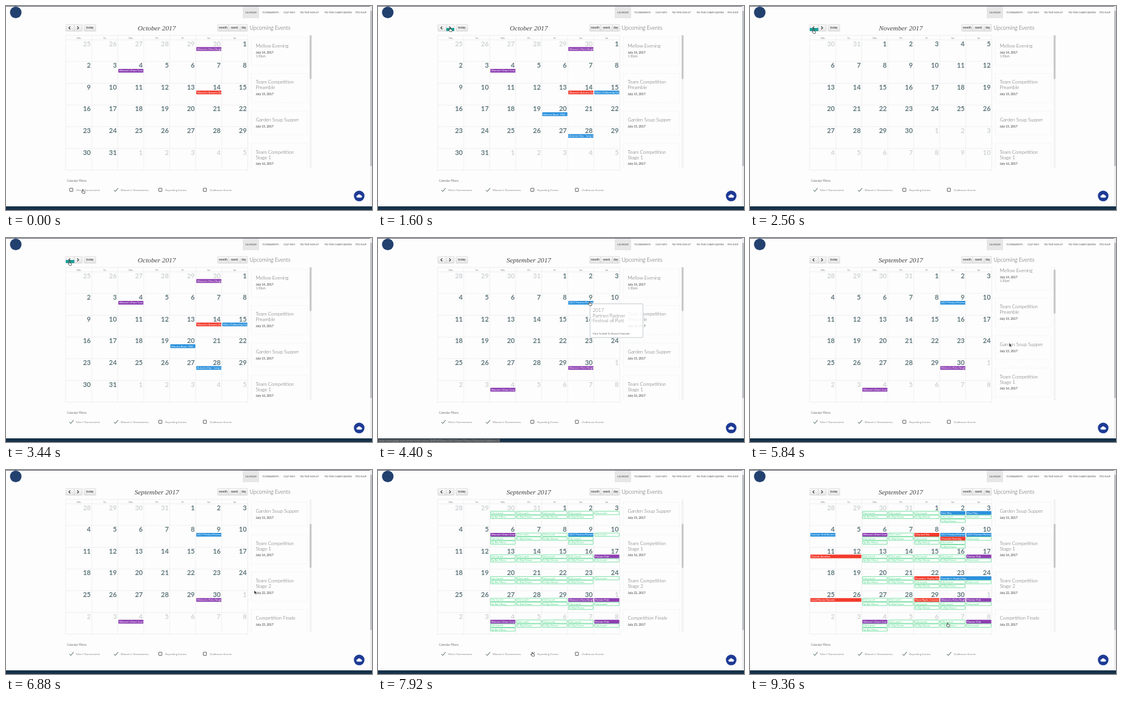
These frames come from a looping animation (600x334 px, 9440 ms). An HTML page:

```html
<!DOCTYPE html>
<html lang="en">
<head>
<meta charset="utf-8">
<title>Club calendar</title>
<style>
html, body { margin: 0; width: 100%; height: 100%; overflow: hidden; background: #fdfdfd; }
svg { display: block; }
text { font-family: Lato, "Open Sans", sans-serif; }
.light { font-weight: 300; }
.bold { font-weight: 700; }
.mid { text-anchor: middle; }
.end { text-anchor: end; }
.title { font: italic 11.3px "Liberation Serif", "Times New Roman", serif; }
</style>
</head>
<body>
<svg id="stage" width="600" height="334" viewBox="0 0 600 334">
  <defs>
    <linearGradient id="btn" x2="0" y2="1"><stop stop-color="#fafafa"/><stop offset="1" stop-color="#e4e4e4"/></linearGradient>
    <clipPath id="listClip"><rect x="399" y="48" width="98" height="218"/></clipPath>
  </defs>
  <rect width="600" height="334" fill="#fdfdfd"/>
  <g id="page"></g>
  <g id="hover"></g>
  <g id="arrows" fill="none" stroke="#333" stroke-width="1.1">
    <path d="M105.3 33.4l-2.3 2.3 2.3 2.3M116.8 33.4l2.3 2.3-2.3 2.3"/>
  </g>
  <g id="calendar"></g>
  <g clip-path="url(#listClip)"><g id="list"></g></g>
  <rect id="thumb" x="497.8" width="3" height="71.5" fill="#c6c6c6"/>
  <g id="filters"></g>
  <g id="popup"></g>
  <g id="status"></g>
  <g id="cursor">
    <path id="arrow" d="M0 0v6l1.4-1.2 1 2.2 1-.5-1-2.1h1.8z" fill="#222" stroke="#fff" stroke-width=".4"/>
    <path id="hand" d="M-.8-2.4q.8-.7 1.3 0v2.2l2.6.6q.7.3.5 1.1l-.6 2.4h-3.1l-2-2.5q0-.9 1.3-.2z" fill="#fff" stroke="#222" stroke-width=".7"/>
  </g>
</svg>
<script>
const LOOP = 9440, STEP = 80;
const LEFT = 98, TOP = 55.3, COL = 42.6, ROW = 35.6;
const PURPLE = '#8e3fb2', RED = '#f23a2c', BLUE = '#2b91dc', GREEN = '#45d483', GRID = '#e6e6e6';
const $ = id => document.getElementById(id);

const rect = (x, y, w, h, fill, more = '') =>
  `<rect x="${x}" y="${y}" width="${w}" height="${h}" fill="${fill}" ${more}/>`;
const line = (x1, y1, x2, y2, color, more = '') =>
  `<path d="M${x1} ${y1}L${x2} ${y2}" stroke="${color}" ${more}/>`;
// y is the middle of the capitals
const text = (x, y, size, color, str, cls = '') =>
  `<text x="${x}" y="${y + size * 0.36}" font-size="${size}" fill="${color}" class="${cls}">${str.replace(/&/g, '&amp;')}</text>`;

const clubCup = "Founder's Trophy Day";
const pairs = "Women's Pairs/Singles", shortCourse = "Women's Short Course";
const partner = '2017 Partner/Partner';

// Event: filter, row, column, colour, label, days
const october = [
  ['w', 0, 5, PURPLE, pairs], ['w', 1, 2, PURPLE, shortCourse],
  ['w', 2, 5, RED, "Women's Autumn Day"], ['m', 2, 6, BLUE, "Men's Fellowship Day"],
  ['m', 3, 4, BLUE, 'Harvest Bowl -TBD'], ['m', 4, 5, BLUE, 'Autumn Day - Long Loop']
];
const september = [
  ['m', 1, 5, BLUE, partner], ['w', 4, 5, PURPLE, pairs], ['w', 5, 2, PURPLE, shortCourse],
  ['r', 1, 2, PURPLE, shortCourse],
  ['c', 0, 5, BLUE, 'Free Play'], ['c', 0, 6, BLUE, 'Free Play'],
  ['c', 1, 0, BLUE, 'Summer End Bouncefest'], ['c', 1, 4, RED, 'Clay and Tea'],
  ['c', 1, 5, RED, 'Chowder Evening'], ['c', 1, 6, BLUE, partner],
  ['c', 2, 0, RED, 'Closed: Aeration', 2],
  ['c', 3, 4, RED, clubCup], ['c', 3, 5, BLUE, clubCup, 2],
  ['c', 4, 0, RED, 'Local Novice Rounds', 2], ['c', 4, 4, RED, 'Pasta Night: Crooners']
];
for (let row = 0; row < 6; row++) {
  if (row > 1 && row !== 3) september.push(['r', row, 6, PURPLE, 'Partner Putt']);
  for (let col = 2; col < 7; col++) {
    september.push(['r', row, col, GREEN, '12a Lunch']);
    if (col < 6) september.push(['r', row, col, GREEN, col === 2 ? '5p Bar Menu' : '5:30p Dinner']);
  }
}

// First date shown, length of the previous month, length of this month
const months = {
  September: { first: 28, before: 31, days: 30, events: september },
  October: { first: 25, before: 30, days: 31, events: october },
  November: { first: 30, before: 31, days: 30, events: [] }
};

function drawPage() {
  let s = rect(0, 0, 600, 0.8, '#3b425c') + rect(596.8, 0, 3.2, 334, '#ececee') + rect(597.3, 8, 2.4, 254, '#b4b7bb');
  s += '<circle cx="16" cy="10.5" r="9.5" fill="#23416f"/>';
  s += rect(388, 1, 27, 19, '#e7e7e7');
  [[392, 'CALENDAR'], [420, 'TOURNAMENTS'], [455, 'GOLF INFO'], [482, 'TEE TIME SIGN UP'],
   [522, 'TEE TIME CHAMP (ADMIN)'], [573, 'PRO SHOP']]
    .forEach(([x, label]) => { s += text(x, 10.8, 3.6, '#555', label); });

  [[98, 27], [128, 19], [347, 49]].forEach(([x, w]) => {
    s += rect(x, 30.3, w, 11, 'url(#btn)', 'rx="1" stroke="#ccc" stroke-width=".6"');
  });
  [112, 365, 384].forEach(x => { s += line(x, 30.3, x, 41.3, '#ccc', 'stroke-width=".6"'); });
  [[137.5, 'today'], [356, 'month'], [374.5, 'week'], [389.8, 'day']]
    .forEach(([x, label]) => { s += text(x, 35.6, 4.9, '#555', label, 'bold mid'); });

  s += text(399.5, 35.7, 8.9, '#555', 'Upcoming Events', 'light');
  s += rect(497.8, 48, 3, 218, '#f1f1f1');
  s += text(100, 286.4, 4.7, '#777', 'Calendar Filters');
  s += rect(0, 328, 600, 6, '#17324a');
  s += '<circle cx="579" cy="311" r="8.7" fill="#1d3a94"/>' +
    '<path d="M576.2 313.8a1.9 1.9 0 0 1 .2-3.8a2.8 2.8 0 0 1 5.2 0a1.9 1.9 0 0 1 .2 3.8z" fill="#fff"/>';
  $('page').innerHTML = s;
}

function drawList() {
  const items = [
    [65, ['Mellow Evening'], 'July 14, 2017', '1:30pm'],
    [124.5, ['Team Competition', 'Preamble'], 'July 15, 2017'],
    [186, ['Garden Soup Supper'], 'July 15, 2017'],
    [239, ['Team Competition', 'Stage 1'], 'July 16, 2017'],
    [300.5, ['Team Competition', 'Stage 2'], 'July 22, 2017'],
    [361.5, ['Competition Finale'], 'July 23, 2017']
  ];
  $('list').innerHTML = items.map(([y, lines, date, time]) => {
    const dateY = y + lines.length * 8.7 + 2.2;
    const height = dateY - y + (time ? 35 : 28);
    return rect(402, y - 14, 92, height, 'none', 'stroke="#e8e8e8" stroke-width=".6" stroke-dasharray="2 1.5"') +
      lines.map((l, i) => text(409.5, y + i * 8.7, 7.9, '#5c5c5c', l, 'light')).join('') +
      text(409.5, dateY, 4.9, '#666', date, 'bold') +
      (time ? text(409.5, dateY + 6.8, 4.8, '#888', time) : '');
  }).join('');
}

function drawPopup() {
  $('popup').innerHTML = rect(347.6, 107.6, 86.8, 55.4, '#fff', 'fill-opacity=".85" rx="2" stroke="#d8dde1" stroke-width="1.6"') +
    ['2017', 'Partner/Partner', 'Festival of Putt'].map((l, i) => text(352, 118.4 + i * 8.6, 7.9, '#6c6c6c', l, 'light')).join('') +
    text(352, 156, 4.3, '#666', 'Click To Add To Shared Calendar');
  $('status').innerHTML = rect(0, 328.5, 200, 5.5, '#4a5056') +
    `<svg x="0" y="328.5" width="199" height="5.5">${text(2, 2.8, 3.8, '#a3a8ac',
      'https://www.google.com/calendar/render?action=TEMPLATE&text=2017+Partner/Partner+Festival+of+Putt&dates=20170909')}</svg>`;
}

function drawCalendar(name, on) {
  const { first, before, days, events } = months[name];
  const right = LEFT + 7 * COL, bottom = TOP + 6 * ROW;
  let s = text(247.2, 36.2, 11.3, '#444', `${name} 2017`, 'title mid');
  s += rect(LEFT, 48, right - LEFT, bottom - 48, 'none', `stroke="${GRID}" stroke-width=".7"`);
  ['Mo', 'Tu', 'We', 'Th', 'Fr', 'Sa', 'Su'].forEach((d, i) => {
    s += text(LEFT + (i + 0.5) * COL, 52, 4.6, '#888', d, 'mid');
    if (i) s += line(LEFT + i * COL, 48, LEFT + i * COL, bottom, GRID, 'stroke-width=".6"');
  });
  for (let r = 0; r < 6; r++) {
    s += line(LEFT, TOP + r * ROW, right, TOP + r * ROW, GRID, 'stroke-width=".6"');
  }
  for (let i = 0; i < 42; i++) {
    const n = first + i - before;
    const inside = n > 0 && n <= days;
    const label = n <= 0 ? n + before : inside ? n : n - days;
    const x = LEFT + (i % 7 + 1) * COL - 1.6, y = TOP + Math.floor(i / 7) * ROW + 6.4;
    s += text(x, y, 11, inside ? '#60777c' : '#d0d4d5', String(label), 'bold end');
  }
  const used = {};
  events.filter(e => on.includes(e[0])).forEach(([, row, col, color, label, span = 1]) => {
    const slot = used[row * 7 + col] || 0;
    for (let d = 0; d < span; d++) used[row * 7 + col + d] = slot + 1;
    const x = LEFT + col * COL + 1, y = TOP + row * ROW + 12 + slot * 6.4, w = COL * span - 1.6;
    const plain = color === GREEN;
    s += plain
      ? rect(x + 0.3, y + 0.3, w - 0.6, 5.5, '#fff', `stroke="${GREEN}" stroke-width=".7" rx=".6"`)
      : rect(x, y, w, 6.1, color, 'rx=".6"');
    s += `<svg x="${x}" y="${y}" width="${w}" height="6.1">${text(1.3, 3, 4.3, plain ? GREEN : '#fff', label)}</svg>`;
  });
  $('calendar').innerHTML = s;
}

function drawFilters(on) {
  const labels = { m: "Men's Tournaments", w: "Women's Tournaments", r: 'Repeating Events', c: 'Clubhouse Events' };
  $('filters').innerHTML = Object.keys(labels).map((key, i) => {
    const x = 107 + i * 73;
    const mark = on.includes(key)
      ? `<path d="M${x - 3} 301.3l2.2 2.4 4.6-5.6" fill="none" stroke="#38504f" stroke-width="1"/>`
      : rect(x - 2.6, 298.3, 5.2, 5.2, '#fff', 'rx=".6" stroke="#555" stroke-width=".9"');
    return mark + text(x + 8, 301.4, 4.6, '#888', labels[key]);
  }).join('');
}

// Cursor path: time, x, y
const path = [
  [0, 126, 303], [480, 126, 303], [1360, 118, 38], [2160, 118, 38], [2560, 104, 41], [3680, 104, 41],
  [4160, 347, 107], [4560, 347, 107], [5440, 425, 172], [6080, 425, 172], [6800, 407, 197],
  [7040, 407, 197], [7600, 253, 301], [7920, 253, 301], [8320, 326, 301], [8720, 326, 301],
  [9280, 324, 253], [9440, 324, 253]
];
const scrolling = [[0, 0], [5680, 0], [5840, 12], [6240, 62], [6640, 119], [9440, 119]];

function at(table, t, k, ease = p => p) {
  let i = 1;
  while (i < table.length - 1 && table[i][0] < t) i++;
  const a = table[i - 1], b = table[i];
  return a[k] + (b[k] - a[k]) * ease(Math.min(1, (t - a[0]) / (b[0] - a[0])));
}
const smooth = p => p * p * (3 - 2 * p);
const within = (t, a, b) => t >= a && t < b;
const show = (id, yes) => { $(id).style.display = yes ? '' : 'none'; };

let lastKey = '';
function render(t) {
  const month = t >= 3600 ? 'September' : within(t, 1760, 2720) ? 'November' : 'October';
  const on = 'w' + (t >= 320 ? 'm' : '') + (t >= 7680 ? 'r' : '') + (t >= 8400 ? 'c' : '');
  if (month + on !== lastKey) {
    lastKey = month + on;
    drawCalendar(month, on);
    drawFilters(on);
  }
  const overNext = within(t, 1360, 2320), overPrev = within(t, 2480, 3760);
  $('hover').innerHTML = overNext ? rect(112, 36, 13, 5, '#1c9f96') : overPrev ? rect(98, 36, 14, 5, '#1c9f96') : '';

  const y = at(scrolling, t, 1);
  $('list').setAttribute('transform', `translate(0 ${-y})`);
  $('thumb').setAttribute('y', 48 + y * 40.5 / 119);

  const hovering = within(t, 4160, 4720);
  show('popup', hovering);
  show('status', hovering);
  const hand = t < 640 || overNext || overPrev || hovering || within(t, 7520, 9440);
  show('hand', hand);
  show('arrow', !hand);
  $('cursor').setAttribute('transform', `translate(${at(path, t, 1, smooth)} ${at(path, t, 2, smooth)})`);
}

drawPage();
drawList();
drawPopup();
const start = performance.now();
function tick() {
  const t = (performance.now() - start) % LOOP;
  render(Math.floor(t / STEP) * STEP);
  requestAnimationFrame(tick);
}
tick();
</script>
</body>
</html>
```
